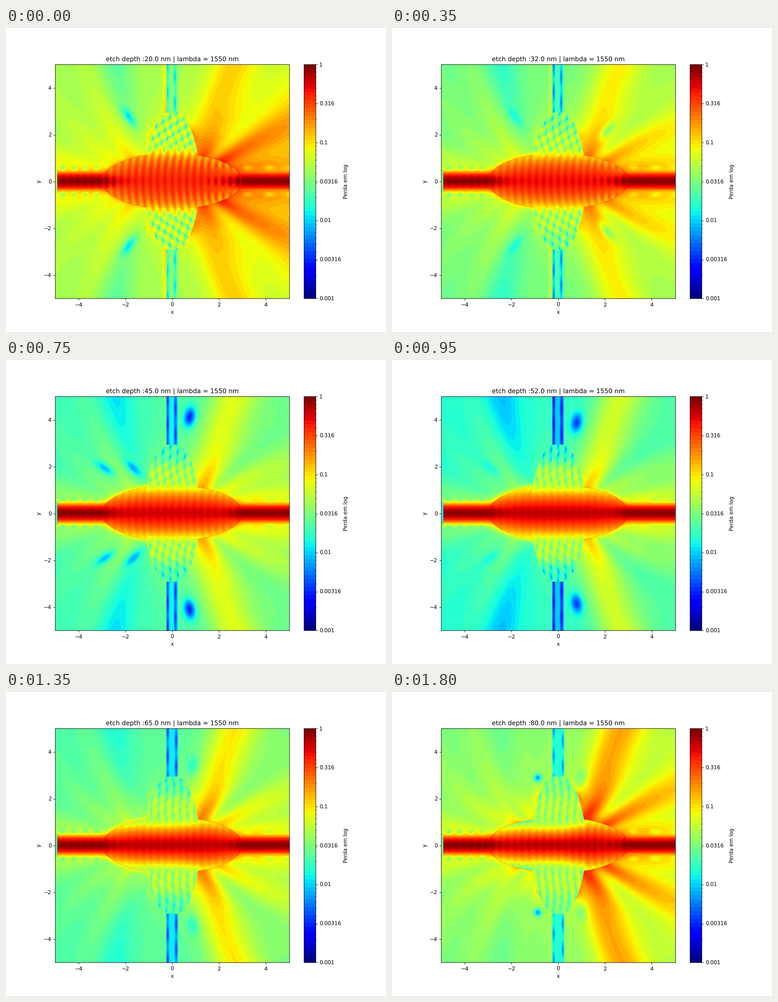
A matplotlib script for the animation above (1.85 s loop, 837 by 669 pixels).

```python
import numpy as np
import matplotlib.pyplot as plt
from matplotlib.animation import FuncAnimation
from matplotlib.colors import LogNorm
from matplotlib.ticker import NullFormatter

FRAMES, INTERVAL = 37, 50
HALF = 258
BANDS = 59
K = 2 * np.pi / 0.31      # fringe wave number inside the crossing

# Upper half plane only; the field is mirrored about y = 0
x, y = np.meshgrid((np.arange(2 * HALF) + 0.5) / HALF * 5 - 5,
                   (np.arange(HALF) + 0.5) / HALF * 5)
dist = np.abs(x)

# Radiated lobes: angle, width (degrees), strength at shallow, middle, deep etch
LOBES = [
    (12, 13, 0.25, 0.30, 0.15),
    (34, 13, 0.43, 0.12, 0.42),
    (70, 13, 0.36, 0.55, 0.62),
    (105, 9, -0.25, -0.25, -0.08),
    (148, 13, -0.08, -0.10, -0.05),
]

# Passing nulls: depth, life, x, y, angle, amount
NULLS = [
    (22, 12, -1.85, 2.75, -55, 0.55),
    (32, 8, 2.1, 2.15, 50, 0.45),
    (45, 7, -2.85, 1.9, -35, 0.50),
    (45, 5, -1.65, 1.9, -45, 0.50),
    (80, 4, -0.87, 2.87, -50, 0.80),
]


def mix(d, shallow, middle, deep):
    return np.interp(d, (20, 52, 80), (shallow, middle, deep))


def bell(v, width):
    return np.exp(-(v / width) ** 2)


def step(v, width):
    return 1 / (1 + np.exp(-np.clip(v / width, -40, 40)))


def spot(cx, cy, long, wide, angle):
    c, s = np.cos(np.radians(angle)), np.sin(np.radians(angle))
    u, v = (x - cx) * c + (y - cy) * s, (y - cy) * c - (x - cx) * s
    return bell(u, long) * bell(v, wide)


def add(*logs):
    """Smooth maximum of several log amplitudes."""
    return np.log10(sum(10 ** (3 * v) for v in logs)) / 3


rho, sigma = np.hypot(x / 3, y / 1.18), np.hypot(x / 1.18, y / 3)
LENS, ARM = rho < 1, sigma < 1
GUIDE = (dist < 0.25) & (y > 2.93)
PORT = (x < -4.9) & (y < 0.5)
gap = np.maximum(rho - 1, 0)
theta = np.degrees(np.arctan2(y, x - np.tanh(x)))
CORE = np.where(y < 0.25, -0.05 - 0.33 * (y / 0.25) ** 2,
                -0.30 - 3.4 * (y - 0.25))
RIM = bell(rho - 1, 0.015) * (dist > 1.05) * (dist < 2.9)
FAN = np.cos(17 * (np.arctan2(y, -dist) - np.radians(131))) * np.exp(-gap / 0.6)
FLANK = np.exp(-np.maximum(sigma - 1, 0) / 0.16) * bell(y - 1.95, 0.45)
WAKE = np.exp(-gap / 0.35) * bell(x - 1.8, 0.9)


def beads(period, start):
    return np.cos(np.pi * (x - start) / period) ** 4


SCALLOP = bell(y - 0.57, 0.1) * (beads(0.475, -4.66) * step(-x - 2.9, 0.1)
                                 + 0.6 * beads(0.95, 3.2) * step(x - 2.9, 0.1))


def outside(d):
    bg = mix(d, -1.35, -1.8, -1.48) + 0.38 * np.exp(-gap / 1.3)
    for angle, width, *strength in LOBES:
        bg += mix(d, *strength) * bell(theta - angle, width)
    bg += 0.04 * np.cos(np.radians(16 * theta) + 0.8 * np.hypot(x, y))
    for d0, life, cx, cy, angle, amount in NULLS:
        bg -= amount * bell(d - d0, life) * spot(cx, cy, 0.16 + 0.3 * (d0 < 80), 0.17, angle)
    # The null beside the vertical guide sinks as the etch deepens
    bg -= (0.3 + 0.65 * bell(d - 47, 8)) * step(d - 38, 2) * spot(
        0.75 + 0.007 * (d - 45), 4.1 - 0.035 * (d - 45), 0.42, 0.24, 80)
    bg += mix(d, 0.02, 0.03, 0.13) * FAN
    bg += mix(d, 0.28, 0, 0.35) * FLANK
    bg += mix(d, 0.2, 0, 0.2) * WAKE
    bg += mix(d, 0.3, 0, 0) * bell(x + 0.3, 0.1) * (y > 2.8)
    halo = mix(d, -0.85, -1, -1) - 4.5 * gap
    return add(bg, halo, CORE) - mix(d, 0.35, 0.2, 0.35) * SCALLOP


def lens(d):
    slope = mix(d, 0.25, 0.85, 1.45) - mix(d, 0, 0, 0.55) * step(x - 0.6, 0.2)
    body = mix(d, -0.40, -0.19, -0.17) - slope * (np.sqrt(y ** 2 + 0.04) - 0.2)
    body -= 0.2 * rho ** 4
    tip = CORE - 0.35 * np.clip(3 - dist, 0, None)
    ripple = np.cos(K * (x - 0.08 * y ** 2))
    ripple += 0.8 * np.cos(K * x) * np.cos(9 * y) * step(x - 1.5, 0.15)
    return add(body, tip) + mix(d, 0.09, 0.02, 0.04) * (0.6 + 0.8 * y) * ripple


def arm(d):
    base = -1.32 - mix(d, 0.05, 0.5, 0.2) * step(y - 2.1, 0.15)
    a = K * x + mix(d, 4, 1.5, 0.5) * y + 1.2 * np.sin(2.8 * y + 0.06 * d)
    b = 10 * x - 15 * y + 0.05 * d
    wave = 1 + 0.42 * np.exp(1j * a) + mix(d, 0.45, 0.15, 0.1) * np.exp(1j * b)
    return base + np.log10(np.abs(wave) + 0.05)


def guide(d):
    out = np.full_like(x, mix(d, -1.45, -2.0, -1.78))
    for cx, phase in ((-0.19, 3.8), (mix(d, 0.12, 0.15, 0.2), 3.35)):
        beat = 1 + mix(d, 0.4, 0.15, 0.7) * np.cos(2 * np.pi * (y - phase) / 1.1)
        out -= mix(d, 0.4, 0.55, 0.22) * beat * bell(x - cx, 0.06)
    return out


def field(d):
    blend = step(y - mix(d, 1.35, 1.1, 0.9), 0.13) * ARM
    inner = lens(d) * (1 - blend) + arm(d) * blend
    level = np.where(LENS | ARM, inner, outside(d)) + 0.1 * RIM
    level += mix(d, 0.05, 0.01, 0.03) * np.cos(K * x) * (x < -2.3) * bell(y, 0.2)
    level = np.where(GUIDE, guide(d), level)
    level = np.where(PORT, mix(d, -1.3, -1.8, -1.5), level)
    level = np.clip(level, -2.95, -0.005)
    return 10 ** np.vstack([level[::-1], level])


def depth(i):
    return float(round(20 + 60 * i / (FRAMES - 1)))


plt.rcParams["text.hinting"] = "none"
fig, ax = plt.subplots(figsize=(10, 7.993), dpi=83.7)
im = ax.imshow(field(depth(0)), extent=(-5, 5, -5, 5), origin="lower",
               cmap=plt.get_cmap("jet", BANDS), norm=LogNorm(1e-3, 1),
               interpolation="nearest")
ax.set(xlabel="x", ylabel="y")
title = ax.set_title("")
ticks = np.logspace(-3, 0, 7)
bar = fig.colorbar(im, ax=ax, ticks=ticks, label="Perda em log")
bar.ax.set_yticks(ticks, [f"{t:.3g}" for t in ticks])
bar.ax.yaxis.set_minor_formatter(NullFormatter())


def update(i):
    d = depth(i)
    im.set_data(field(d))
    title.set_text(f"etch depth :{d:.1f} nm | lambda = 1550 nm")
    return im, title


anim = FuncAnimation(fig, update, frames=FRAMES, interval=INTERVAL, repeat=True)
plt.show()
```
